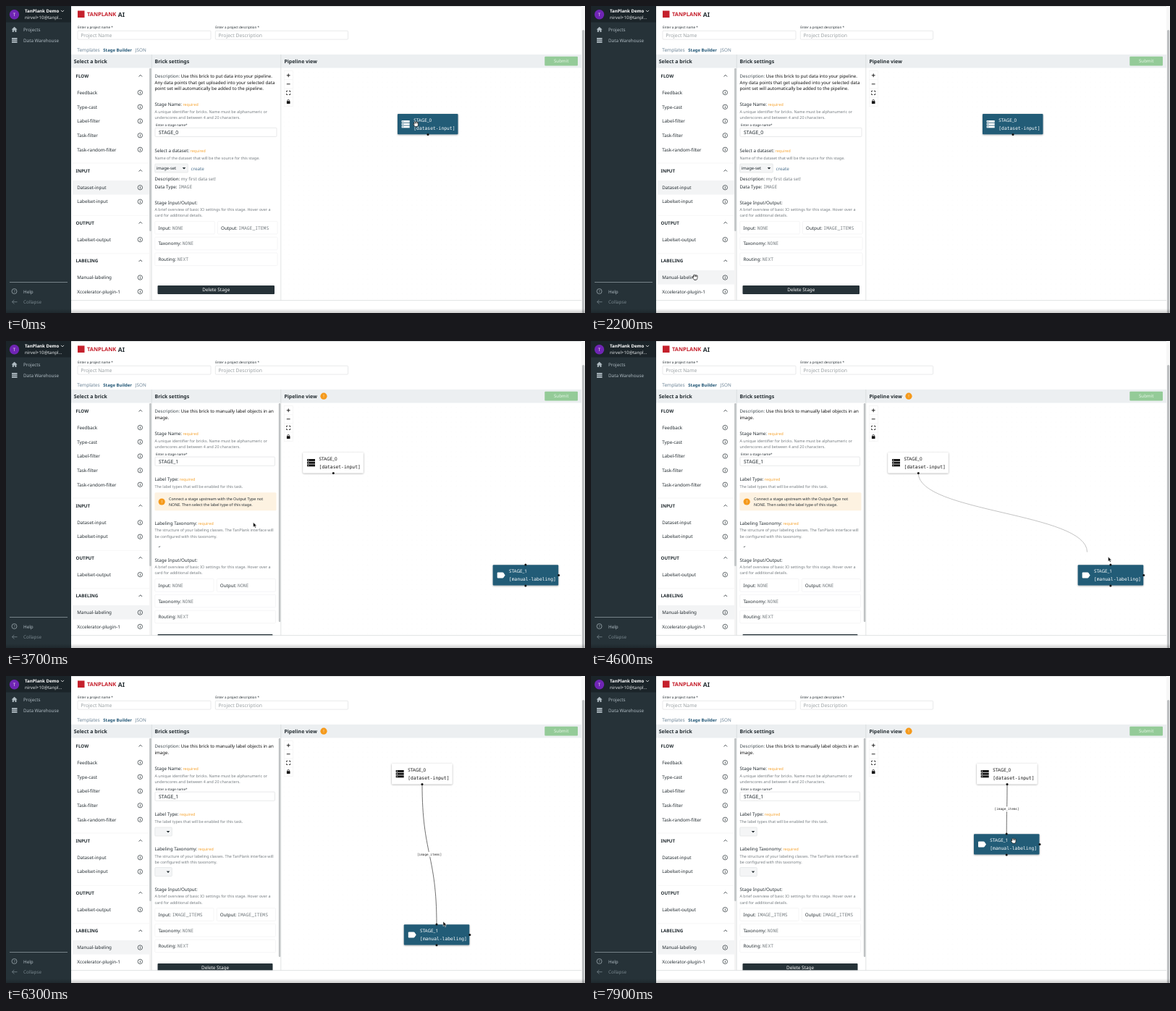
An HTML page for the animation above (8000 ms loop, 800 by 424 pixels).

```html
<!DOCTYPE html>
<html lang="en">
<head>
<meta charset="utf-8">
<title>Stage builder</title>
<style>
html, body { margin: 0; width: 100%; height: 100%; overflow: hidden; background: #fff; }
svg { display: block; width: 800px; height: 424px; font-family: "Noto Sans", "Open Sans", sans-serif; text-rendering: geometricPrecision; }
text { white-space: pre; }
.mono { font-family: "Noto Sans Mono", monospace; }
.code { font-family: "DejaVu Sans Mono", monospace; }
</style>
</head>
<body>
<svg id="stage" viewBox="0 0 800 424"></svg>
<script>
const DARK = '#263238', INK = '#222b30', GRAY = '#757c80', ORANGE = '#f5a12b', BLUE = '#205b77';

// Text is placed by its left edge and the vertical middle of its line.
const text = (x, y, s, size = 6.25, fill = INK, more = '') =>
  `<text x="${x}" y="${y + size * .36}" font-size="${size}" fill="${fill}" ${more}>${s}</text>`;
const bold = 'font-weight="600"';
const rect = (x, y, w, h, fill, more = '') =>
  `<rect x="${x}" y="${y}" width="${w}" height="${h}" fill="${fill}" ${more}/>`;
const line = (d, color = INK, w = .8, more = '') =>
  `<path d="${d}" fill="none" stroke="${color}" stroke-width="${w}" ${more}/>`;
const dot = (x, y, r, fill, more = '') => `<circle cx="${x}" cy="${y}" r="${r}" fill="${fill}" ${more}/>`;
const mono = s => `<tspan class="mono" fill="#737a7e" font-size="6.35">${s}</tspan>`;
const box = (x, y, w, h) => rect(x, y, w, h, '#fff', 'rx="1.2" stroke="#d0d3d5" stroke-width=".5"');
const alertIcon = (x, y) => dot(x, y, 4.6, '#f59a1c') + text(x, y, '!', 5.5, '#fff', 'text-anchor="middle"');
const bars = (x, y, fill) => [0, 3.7, 7.4].map(d =>
  rect(x, y + d, 11, 2.9, fill) + dot(x + 1.8, y + d + 1.45, .6, fill === '#fff' ? BLUE : '#fff')).join('');

function sidebar() {
  const pale = '#aebac1';
  return rect(0, 0, 90, 424, DARK) + rect(0, 0, 90, 22.5, '#1b2429') +
    dot(11.5, 11.8, 6.7, '#6f25b4') + text(11.5, 11.9, 'T', 6, '#eee', 'text-anchor="middle"') +
    text(26, 6.8, 'TanPlank Demo', 6.1, '#fff', bold) + text(26, 16.3, 'nirvel+10@tanpl...', 6.1, '#e3e7e9') +
    line('M76 5.9l2 2 2-2', '#fff') +
    `<path d="M11.6 28.8l4 3.7h-1.2v3.6h-2v-2.4h-1.6v2.4h-2v-3.6H7.6z" fill="${pale}"/>` + text(24, 33, 'Projects', 6.3, pale) +
    [44, 46.5, 49].map(y => rect(8, y, 7.5, 1.8, pale)).join('') + text(24, 47.3, 'Data Warehouse', 6.3, pale) +
    line('M5 381.5H85', '#9aa5ab', .7) +
    dot(11.5, 394, 3.5, 'none', `stroke="${pale}" stroke-width=".7"`) +
    text(11.5, 394.1, '?', 5, pale, 'text-anchor="middle"') + text(24, 394.3, 'Help', 6.3, pale) +
    line('M15.5 408.7H8.5M11.3 405.9l-2.8 2.8 2.8 2.8', '#78868d') + text(24, 408.8, 'Collapse', 6.3, '#78868d');
}

function topBar() {
  const field = (x, w, label, hint) => text(x, 29.7, label, 4.6) + box(x, 34.3, w, 11.8) +
    text(x + 4.2, 40.2, hint, 6.8, '#9aa0a3');
  return rect(90, 0, 710, .8, '#d0d2d3') + rect(99, 6.5, 9.5, 9.5, '#c5202c') +
    text(112, 11.5, 'TANPLANK', 7.5, '#c5202c', 'font-weight="700"') +
    text(154.8, 11.5, 'AI', 8.5, INK, 'font-weight="700"') +
    field(99, 184, 'Enter a project name *', 'Project Name') +
    field(289.3, 183.3, 'Enter a project description *', 'Project Description') +
    text(98.3, 60.7, 'Templates', 6.5, '#6a8295') + text(134.3, 60.7, 'Stage Builder', 5.95, '#245877', bold) +
    text(178.8, 60.7, 'JSON', 6.3, '#6a8295') +
    rect(90, 67, 705, 18.5, '#eceff1') + text(93.8, 76.3, 'Select a brick', 6.95, INK, bold) +
    text(205.5, 76.3, 'Brick settings', 6.95, INK, bold) + text(384.4, 76.3, 'Pipeline view', 6.95, INK, bold);
}

function brickList() {
  const heads = { FLOW: 96.5, INPUT: 227.5, OUTPUT: 299.5, LABELING: 352 };
  const rows = {
    'Feedback': 119.5, 'Type-cast': 139.3, 'Label-filter': 159, 'Task-filter': 178.7, 'Task-random-filter': 198.3,
    'Dataset-input': 250.7, 'Labelset-input': 270.2, 'Labelset-output': 322.6, 'Manual-labeling': 375, 'Xccelerator-plugin-1': 394.4
  };
  let s = rect(92, 241, 106, 19.5, '#f3f4f5', 'id="rowInput"') + rect(92, 365, 106, 19.5, '#f3f4f5', 'id="rowManual"');
  for (const y of [217, 289.3, 341.8]) s += line(`M92 ${y}H198`, '#eeeeee', .5);
  for (const [name, y] of Object.entries(heads))
    s += text(96.5, y, name, 6.2, INK, bold) + line(`M183.5 ${y + 1}l2.3 -2.3 2.3 2.3`);
  for (const [name, y] of Object.entries(rows))
    s += text(98.2, y, name, 6.3) + dot(185.3, y, 3.2, 'none', `stroke="${INK}" stroke-width=".7"`) +
      rect(184.9, y - .4, .8, 2.1, INK) + rect(184.9, y - 1.7, .8, .8, INK);
  return s + rect(198, 86, 3, 320, '#f4f4f4') + rect(198.2, 86, 2.6, 225, '#bfc2c4', 'rx="1.2"');
}

const title = (y, s, required) => text(205.5, y, s +
  (required ? `<tspan font-size="5.3" fill="${ORANGE}"> required</tspan>` : ''));
const note = (y, ...rows) => rows.map((s, i) => text(205.5, y + i * 8.2, s, 5.4, GRAY)).join('');
const describe = (...rows) => rows.map((s, i) => text(205.5, 97 + i * 8.4, s, 6.15, '#111')).join('');
const lead = `<tspan fill="#3b464c">Description:</tspan> `;
const picker = (y, w, s) => rect(205.8, y, w, 12, '#f4f5f6', 'rx="1" stroke="#d5d8da" stroke-width=".5"') +
  text(207.8, y + 6, s, 5.9) + `<path d="M${200.8 + w - 2.6} ${y + 5}h4.6l-2.3 2.5z" fill="${INK}"/>`;

function stageName(y, w, value) {
  return title(y, 'Stage Name:', true) +
    note(y + 10.2, 'A unique identifier for bricks. Name must be alphanumeric or', 'underscores and between 4 and 20 characters.') +
    box(206, y + 32.3, w, 12.2) + text(207, y + 28.2, 'Enter a stage name*', 4.5) + text(211, y + 38.5, value, 6.9);
}

function inOut(y, right, input, output) {
  const card = (x, dy, w, label, value) =>
    rect(x, y + dy - 9, w, 17.6, '#fff', 'rx="1.2" stroke="#eeeff0" stroke-width=".6"') +
    text(x + 4.6, y + dy, `${label}: ${mono(value)}`);
  const half = (right - 210) / 2, mid = right - half;
  return title(y, 'Stage Input/Output:') +
    note(y + 9.8, 'A brief overview of basic IO settings for this stage. Hover over a', 'card for additional details.') +
    card(205.8, 35, half, 'Input', input) + card(mid, 35, half, 'Output', output) +
    card(205.8, 56.8, right - 205.8, 'Taxonomy', 'NONE') + card(205.8, 78.6, right - 205.8, 'Routing', 'NEXT');
}

const deleteButton = (y, w) => rect(209.5, y, w, 12, DARK, 'rx="1"') +
  text(209.5 + w / 2, y + 6, 'Delete Stage', 6.4, '#fff', 'text-anchor="middle"');

const datasetPanel = () =>
  describe(lead + 'Use this brick to put data into your pipeline.',
    'Any data points that get uploaded into your selected data', 'point set will automatically be added to the pipeline.') +
  stageName(136, 168, 'STAGE_0') +
  title(200, 'Select a dataset:', true) + note(210, 'Name of the dataset that will be the source for this stage.') +
  picker(218, 45.5, 'image-set') + text(255.5, 224.3, 'create', 6.25, '#4a6f8c') +
  text(205.5, 238.7, `Description: <tspan fill="${GRAY}">my first data set!</tspan>`, 6.15) +
  text(205.5, 249.4, `Data Type: ${mono('IMAGE')}`) +
  inOut(271.4, 375, 'NONE', 'IMAGE_ITEMS') + deleteButton(386, 161.5);

function labelPanel(linked) {
  const y = linked ? 239.2 : 251.8;
  const warning = rect(205.5, 209.3, 168, 25, '#fdf2e1', 'rx="1.5"') + alertIcon(215.2, 222) +
    text(225, 218, 'Connect a stage upstream with the Output Type not', 5.35) +
    text(225, 225.8, 'NONE. Then select the label type of this stage.', 5.35);
  return describe(lead + 'Use this brick to manually label objects in an', 'image.') +
    stageName(127.8, 165.5, 'STAGE_1') +
    title(191, 'Label Type:', true) + note(201, 'The label types that will be enabled for this task.') +
    (linked ? picker(209, 23.5, '') + picker(264.5, 23.5, '') : warning + line('M210.8 284.5l2.4 -.7', INK, .7, 'id="dash"')) +
    title(y, 'Labeling Taxonomy:', true) +
    note(y + 9.7, 'The structure of your labeling classes. The TanPlank interface will', 'be configured with this taxonomy.') +
    inOut(linked ? 294.6 : 302.5, 372.5, linked ? 'IMAGE_ITEMS' : 'NONE', linked ? 'IMAGE_ITEMS' : 'NONE') +
    deleteButton(linked ? 397 : 405, 159) +
    rect(376.8, 86, 2.6, 302, '#bfc2c4', 'rx="1.2"');
}

function controls() {
  return rect(384.2, 89.5, 12, 49, '#fff', 'stroke="#eee" stroke-width=".5"') +
    line('M384 101.7h12M384 113.9h12M384 126h12', '#eee', .5) +
    line('M387.8 95.8h4.8M390.2 93.4v4.8M387.8 107.8h4.8', '#111', .9) +
    line('M387.6 119v-1.7h1.7M391 117.3h1.7v1.7M392.7 120.8v1.7h-1.7M389.3 122.5h-1.7v-1.7', '#111', .8) +
    rect(387.9, 131.3, 4.6, 3.6, '#111', 'rx=".5"') + line('M388.9 131.5v-.9a1.3 1.3 0 0 1 2.6 0v.9', '#111', .7);
}

function node(id, w, name, kind, fill, ink, icon, handles) {
  return `<g id="${id}">` + rect(0, 0, w, 28.3, fill, 'rx="1" filter="url(#shadow)"') + icon +
    text(22.3, 8.9, name, 6.3, ink) + text(22.3, 19.8, kind, 6.33, ink, 'class="code"') +
    handles.map(([x, y]) => dot(x, y, 1.5, '#111')).join('') + '</g>';
}

const el = {}, svg = document.getElementById('stage');
const dataNode = (id, fill, ink) =>
  node(id, 83.5, 'STAGE_0', '[dataset-input]', fill, ink, bars(5.7, 9, ink), [[42, 28.6]]);

svg.innerHTML = `<defs>
  <filter id="shadow" x="-10%" y="-20%" width="120%" height="150%"><feDropShadow dx="0" dy=".7" stdDeviation="1" flood-opacity=".4"/></filter>
  <pattern id="dots" width="6.8" height="6.8" patternUnits="userSpaceOnUse"><circle cx="3" cy="3" r=".35" fill="#e6e6e6"/></pattern>
  <linearGradient id="fade" x2="0" y2="1"><stop stop-opacity="0"/><stop offset="1" stop-opacity=".2"/></linearGradient>
  <clipPath id="body">${rect(90, 85.5, 705, 321.2, '#000')}</clipPath></defs>` +
  rect(0, 0, 800, 424, '#fff') + topBar() +
  '<g clip-path="url(#body)">' + brickList() +
  `<g id="panel0">${datasetPanel()}</g><g id="panel1">${labelPanel(false)}</g><g id="panel2">${labelPanel(true)}</g>` +
  '<g id="pane">' + rect(380, 86, 415, 321, 'url(#dots)') + controls() +
  line('', '#333', .7, 'id="edge"') +
  '<g id="label">' + rect(-18, -3.5, 36, 7, '#fff') +
  text(0, 0, '[image_items]', 4.35, '#222', 'class="code" text-anchor="middle"') + '</g>' +
  dataNode('first', BLUE, '#fff') + dataNode('source', '#fff', '#111') +
  node('target', 90.5, 'STAGE_1', '[manual-labeling]', BLUE, '#fff',
    '<path d="M6 11.2q0-1 1-1h6.4q.8 0 1.3.7l2.3 3.3-2.3 3.3q-.5.7-1.3.7H7q-1 0-1-1z" fill="#fff"/>',
    [[45.2, -.2], [45.2, 28.6], [91, 14.2]]) + '</g></g>' +
  `<g id="alert">${alertIcon(439, 76.2)}</g>` +
  `<g id="submit">${rect(744.3, 69.8, 45.7, 12.6, '#94cb98', 'rx="1"') + text(767.2, 76.1, 'Submit', 6.1, '#e6f5e7', 'text-anchor="middle"')}</g>` +
  line('M201.2 67V406.5M379.8 67V406.5', '#d5d8da', .7) + line('M90 406.6H795', '#d5d8da', .7) +
  rect(795, 0, 5, 424, '#f7f7f7') + rect(796, 33, 3.3, 391, '#bdbfc1', 'rx="1.6"') +
  sidebar() + rect(0, 418, 800, 6, 'url(#fade)') +
  `<path id="arrow" d="M0 0v6.6l1.6-1.4 1.1 2.4 1.2-.5-1.1-2.4h2z" fill="#111" stroke="#fff" stroke-width=".5"/>
  <path id="hand" d="M-2 .5v-3.2q.7-1.2 1.5 0q.7-1 1.4 0q.8-.7 1.4.2q1-.3 1.2.7v2.6q-.2 1.6-1 2.8h-3.4l-2.4-3.2q0-1.4 1.3-.4zM-.5-2.6v2M.9-2.6v2M2.3-2.3v1.8" fill="#fff" stroke="#111" stroke-width=".7"/>`;
svg.querySelectorAll('[id]').forEach(e => el[e.id] = e);

// Straight moves between [time, x, y] points.
function along(t, points) {
  const i = points.findIndex(p => p[0] > t);
  if (i === 0) return points[0].slice(1);
  if (i < 0) return points.at(-1).slice(1);
  const [a, b] = [points[i - 1], points[i]], k = (t - a[0]) / (b[0] - a[0]);
  return [a[1] + (b[1] - a[1]) * k, a[2] + (b[2] - a[2]) * k];
}

const sourcePath = [[5200, 410.3, 154], [5450, 490, 128], [5700, 533, 121]];
const targetPath = [[5850, 672.7, 309.3], [6000, 600, 362], [6100, 560, 376], [6300, 549.8, 343.2], [6600, 549.8, 343.2],
  [6800, 544, 286], [7000, 537.7, 239], [7300, 532, 226], [7600, 529.3, 220], [7900, 529, 218.3]];
const wirePath = [[4200, 452.3, 183], [4400, 560, 235], [4600, 685.5, 291.5], [4700, 718, 309]];
const cursorPath = [[200, 566, 163], [700, 572, 200], [1100, 579, 247], [1250, 579, 247], [1600, 330, 345], [1900, 160, 400],
  [2050, 142, 405], [2200, 143.5, 374.5], [3100, 143.5, 374.5], [3600, 310, 270], [4050, 452, 182], [4200, 452, 183],
  [4400, 590, 243], [4600, 714.5, 298], [4700, 729, 310], [4850, 719, 309], [5150, 452, 165], [5200, 452, 165],
  [5450, 533, 139], [5700, 575, 132], [5850, 727, 318], [6000, 654, 370], [6100, 614, 384], [6300, 604, 339],
  [6600, 604, 345], [6800, 597, 290], [7000, 590.5, 244.5], [7300, 586, 234], [7600, 583.5, 229], [7900, 583.5, 227.5]];

const show = (e, on) => e.setAttribute('visibility', on ? 'visible' : 'hidden');
const move = (e, x, y) => e.setAttribute('transform', `translate(${x} ${y})`);

function draw(t) {
  const added = t >= 2900, loaded = t >= 3100, linked = t >= 4750;
  const [sx, sy] = along(t, sourcePath), [tx, ty] = along(t, targetPath), [cx, cy] = along(t, cursorPath);
  show(el.panel0, !added);
  show(el.panel1, added && !linked);
  show(el.panel2, linked);
  show(el.alert, added);
  const paneOn = !added || loaded;
  el.pane.style.display = paneOn ? '' : 'none';
  show(el.submit, paneOn);
  show(el.dash, loaded && !linked);
  show(el.rowInput, !added);
  show(el.rowManual, t >= 2200);
  show(el.first, !added);
  show(el.source, loaded);
  show(el.target, loaded);
  move(el.first, 541, 149);
  move(el.source, sx, sy);
  move(el.target, tx, ty);

  const x1 = sx + 42, y1 = sy + 28.5;
  const [x2, y2] = linked ? [tx + 45.2, ty] : along(t, wirePath), my = (y1 + y2) / 2;
  el.edge.setAttribute('d', `M${x1} ${y1}C${x1} ${my} ${x2} ${my} ${x2} ${y2}`);
  el.edge.setAttribute('stroke', linked ? '#333' : '#aaa');
  show(el.edge, t >= 4200);
  show(el.label, linked);
  move(el.label, (x1 + x2) / 2, my);

  const hand = t < 600 || t >= 2000 && t < 3200 || t >= 5150 && t <= 5700 || t >= 5850 && t < 6200 || t >= 6700;
  show(el.hand, hand);
  show(el.arrow, !hand);
  move(hand ? el.hand : el.arrow, cx, cy);
}

function tick(now) {
  draw(Math.floor(now / 100) * 100 % 8000);
  requestAnimationFrame(tick);
}
draw(0);
requestAnimationFrame(tick);
</script>
</body>
</html>
```
